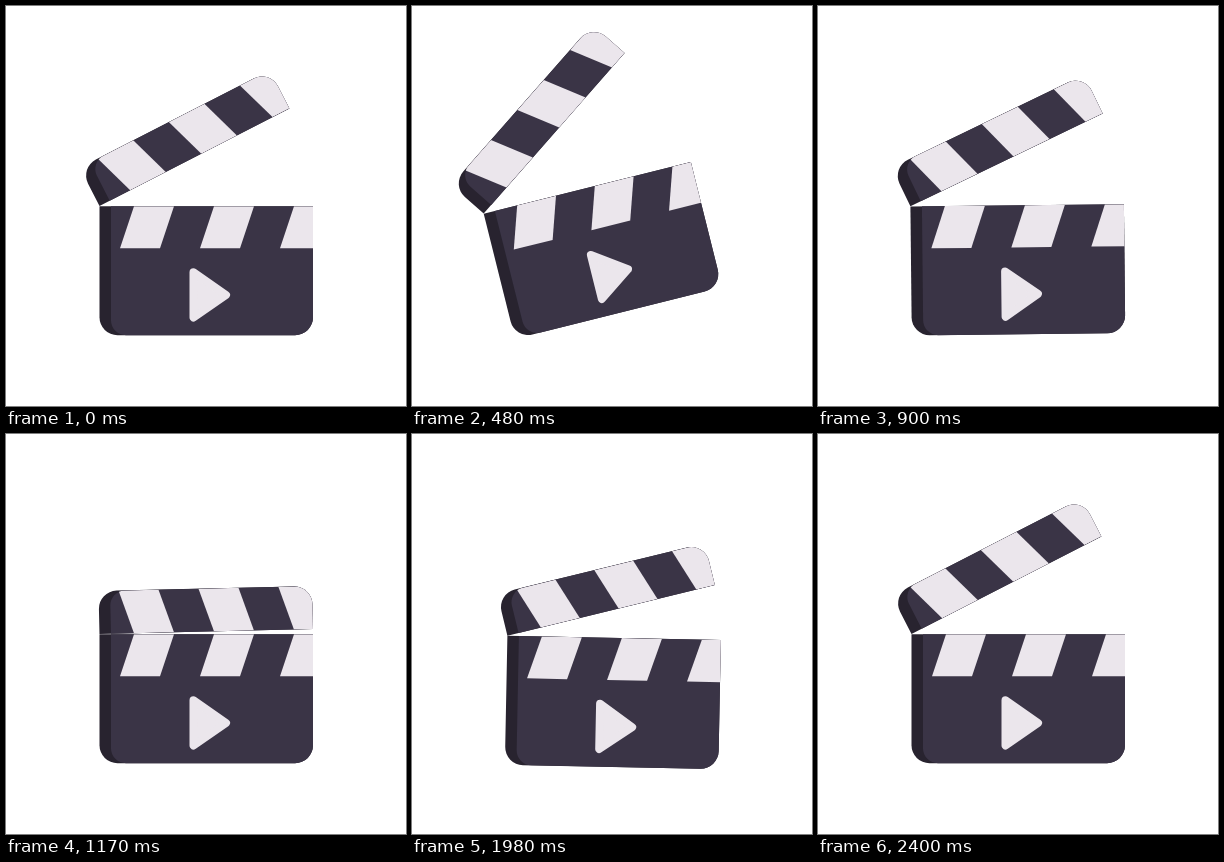
Write an HTML page with a canvas that moves like this. It is 400 by 400 pixels and loops after 3.46 s.

```html
<!DOCTYPE html>
<html lang="en">
<head>
<meta charset="utf-8">
<title>Clapperboard</title>
<style>
  html, body { margin: 0; width: 100%; height: 100%; overflow: hidden; background: #fff; }
  canvas { display: block; width: 400px; height: 400px; }
</style>
</head>
<body>
<canvas id="stage"></canvas>
<script>
const LOOP = 3460;
const INK = '#3a3446', SHADE = '#28232f', PALE = '#ebe6ec';
const LEFT = 93.5, RIGHT = 307, SEAM = 200, TOP = 157, BOTTOM = 329.2, R = 18;
const MID = { x: 200, y: 264.5 };

const canvas = document.getElementById('stage');
const ctx = canvas.getContext('2d');
const dpr = window.devicePixelRatio || 1;
canvas.width = canvas.height = 400 * dpr;

// Eases: smooth in-out (p < 1 leans early), plain power, and a half-sine hop.
const smooth = (p = 1) => x => { const s = x ** p; return s * s * (3 - 2 * s); };
const power = p => x => x ** p;

// Keys: [time, ease from the previous key, ...values]
const BODY = [ // tilt in degrees, shift x, shift y
  [0, null, 0, 0, 0],
  [130, smooth(), 3.6, 2, 12],
  [570, smooth(0.66), -15, -10, -22],
  [960, smooth(0.79), 0, 0, 0],
  [1590, smooth(), 0, 0, 0],
  [1830, smooth(), 3.6, 2, 12],
  [2070, smooth(), 0, 0, 0]
];
const ARM = [ // opening in degrees, relative to the body
  [0, null, 27.2],
  [150, smooth(), 10],
  [600, smooth(0.85), 38.5],
  [1060, power(2.5), 0],
  [1900, smooth(), 0],
  [2085, smooth(), 36.4],
  [2400, smooth(0.8), 27.2]
];

function sample(keys, t) {
  const i = keys.findIndex(k => k[0] > t);
  if (i < 0) return keys[keys.length - 1].slice(2);
  const a = keys[i - 1], b = keys[i];
  const f = b[1]((t - a[0]) / (b[0] - a[0]));
  return a.slice(2).map((v, n) => v + (b[n + 2] - v) * f);
}

function bounce(t) {
  const x = (t - 1060) / 260;
  return x > 0 && x < 1 ? 1.35 * Math.sin(Math.PI * x) : 0;
}

const rad = deg => deg * Math.PI / 180;

function panel(x, y, bottom, radii, color) {
  ctx.beginPath();
  ctx.roundRect(x, y, RIGHT - x, bottom - y, radii);
  ctx.fillStyle = color;
  ctx.fill();
}

// Three slanted bars, clipped to the panel drawn just before.
function stripes(x0, y0, x1, y1) {
  ctx.save();
  ctx.clip();
  ctx.fillStyle = PALE;
  for (let i = 0; i < 3; i++) {
    const d = i * 80;
    ctx.beginPath();
    ctx.moveTo(x0 + d, y0);
    ctx.lineTo(x0 + d + 40, y0);
    ctx.lineTo(x1 + d + 40, y1);
    ctx.lineTo(x1 + d, y1);
    ctx.fill();
  }
  ctx.restore();
}

function drawPlay() {
  ctx.beginPath();
  ctx.moveTo(187.5, 266.2);
  ctx.lineTo(220, 289);
  ctx.lineTo(187.5, 311.5);
  ctx.closePath();
  ctx.lineWidth = 8;
  ctx.lineJoin = 'round';
  ctx.fillStyle = ctx.strokeStyle = PALE;
  ctx.fill();
  ctx.stroke();
}

function drawBody() {
  const y = SEAM + 0.2;
  panel(LEFT, y, BOTTOM, [0, 0, R, R], SHADE);
  panel(105, y, BOTTOM, [0, 0, R, 15], INK);
  stripes(128, y, 114, 242.3);
  drawPlay();
}

function drawArm(open) {
  ctx.save();
  ctx.translate(LEFT, SEAM);
  ctx.rotate(rad(-open));
  ctx.translate(-LEFT, -SEAM);
  panel(LEFT, TOP, SEAM, [R, R, 0, 0], SHADE);
  panel(105, TOP, SEAM, [15, R, 0, 0], INK);
  stripes(113.5, TOP, 128, SEAM);
  ctx.restore();
}

function draw(t) {
  const [tilt, dx, dy] = sample(BODY, t);
  const [open] = sample(ARM, t);
  ctx.setTransform(dpr, 0, 0, dpr, 0, 0);
  ctx.fillStyle = '#fff';
  ctx.fillRect(0, 0, 400, 400);
  ctx.translate(MID.x + dx, MID.y + dy);
  ctx.rotate(rad(tilt));
  ctx.translate(-MID.x, -MID.y);
  drawBody();
  drawArm(open + bounce(t));
}

const start = performance.now();
function tick() {
  draw((performance.now() - start) % LOOP);
  requestAnimationFrame(tick);
}
tick();
</script>
</body>
</html>
```
